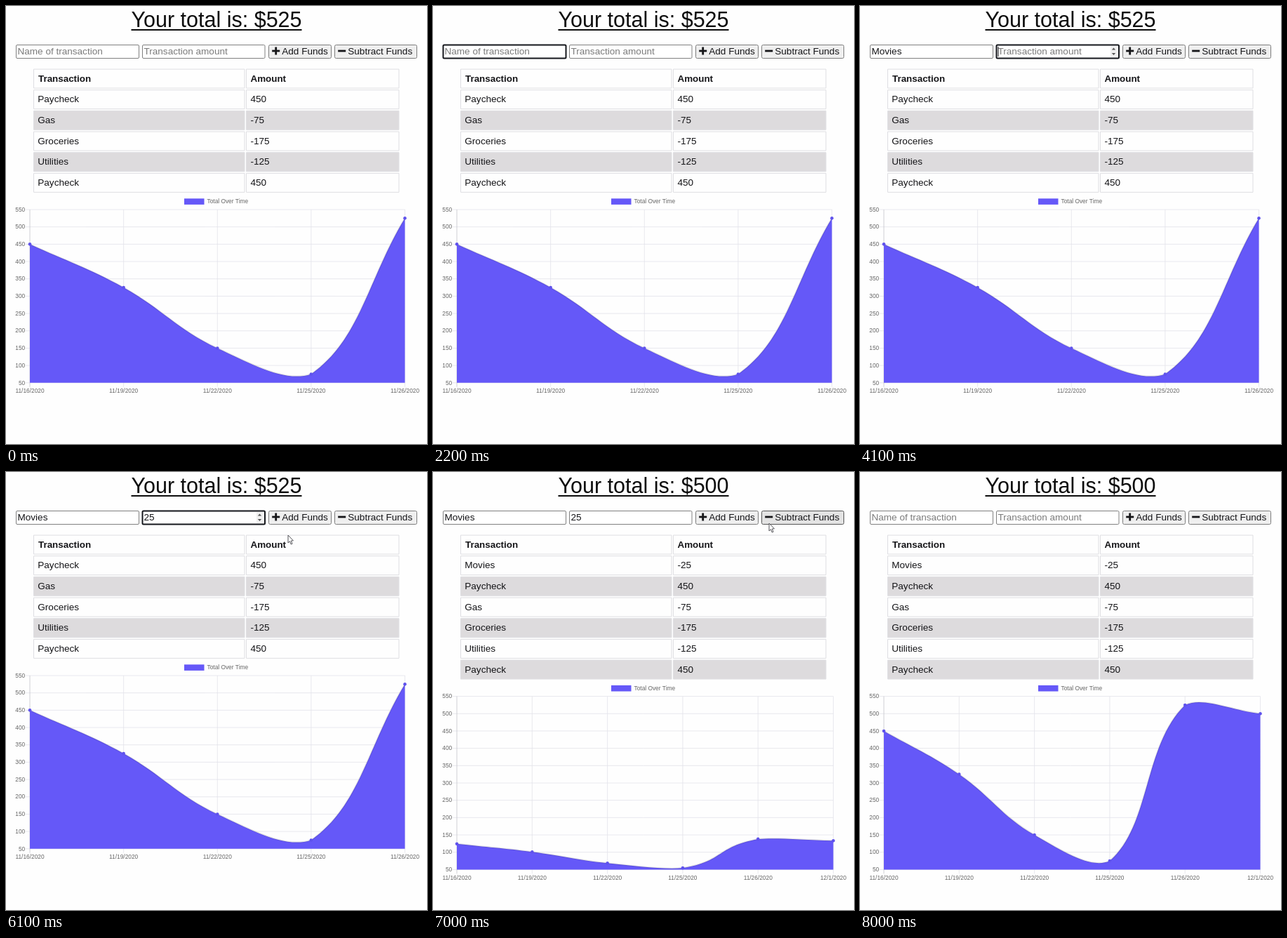
These frames come from a looping animation (600x624 px, 9 s). An HTML page with a canvas:

```html
<!DOCTYPE html>
<html lang="en">
<head>
<meta charset="utf-8">
<title>Budget tracker</title>
<style>
html, body { margin: 0; width: 600px; height: 624px; overflow: hidden; background: #fefefe; }
canvas { position: absolute; left: 0; top: 0; }
h1 {
  position: absolute; z-index: 1; left: 0; top: 1px; width: 600px; margin: 0;
  font: 30.5px/36px "Liberation Sans", Arial, sans-serif; text-align: center; color: #0c0c0c;
  text-decoration: underline; text-decoration-thickness: 2px; text-underline-offset: 3px;
}
</style>
</head>
<body>
<h1 id="total"></h1>
<canvas id="stage" width="600" height="624"></canvas>
<script>
const ctx = document.getElementById('stage').getContext('2d');
const title = document.getElementById('total');
const LOOP = 9000, STEP = 100, BLINK = 530;
const FAMILY = '"Liberation Sans", Arial, sans-serif';
const BODY = `13.55px ${FAMILY}`, SMALL = `8.35px ${FAMILY}`;
const PURPLE = '#6558f8', INK = '#151518';

const PRESS = 6900, SUBMIT = 6950, ADDED = 7000, CLEARED = 7100, HOVER = 6500, LEAVE = 7900;
const ROWS = [['Paycheck', 450], ['Gas', -75], ['Groceries', -175], ['Utilities', -125], ['Paycheck', 450]];
const NEW_ROW = ['Movies', -25];
const HISTORY = [['11/16/2020', 450], ['11/19/2020', 325], ['11/22/2020', 150], ['11/25/2020', 75], ['11/26/2020', 525]];
const NEW_POINT = ['12/1/2020', 500];

const NAME = { x: 14, w: 176, hint: 'Name of transaction', text: 'Movies',
  focus: 1670, blur: 4070, keys: [2700, 2800, 2900, 3100, 3200, 3370] };
const AMOUNT = { x: 194, w: 175.5, hint: 'Transaction amount', text: '25',
  focus: 4070, blur: PRESS, keys: [4870, 5200], spinner: true };

// Pointer trips as [time, x, y]
const TRIPS = [
  [[400, 590, 505], [500, 550, 394], [600, 550, 394], [700, 470, 300], [900, 270, 150], [1000, 170, 90]],
  [[5900, 190, 84], [6000, 300, 93], [6100, 402, 90], [6200, 446, 88], [6300, 466, 82],
   [6400, 476, 77], [6500, 479, 73], [LEAVE - STEP, 479, 73]]
];

function text(str, x, y, color = INK, font = BODY, align = 'left') {
  ctx.font = font;
  ctx.textAlign = align;
  ctx.fillStyle = color;
  ctx.fillText(str, x, y);
}

function rect(x, y, w, h, fill, stroke, line = 1, radius = 0) {
  ctx.beginPath();
  ctx.roundRect(x + .5, y + .5, w - 1, h - 1, radius);
  ctx.fillStyle = fill;
  ctx.fill();
  ctx.strokeStyle = stroke;
  ctx.lineWidth = line;
  ctx.stroke();
}

function polygon(points, fill, stroke) {
  ctx.beginPath();
  points.forEach(([x, y]) => ctx.lineTo(x, y));
  ctx.closePath();
  ctx.fillStyle = fill;
  ctx.fill();
  if (stroke) {
    ctx.strokeStyle = stroke;
    ctx.lineWidth = 1;
    ctx.stroke();
  }
}

function drawField(field, t) {
  const { x, w } = field;
  const focused = t >= field.focus && t < field.blur;
  const pressed = field.keys.filter(k => t >= k);
  const value = t < CLEARED ? field.text.slice(0, pressed.length) : '';
  rect(x, 55, w, 20, '#fff', focused ? '#15171c' : '#808080', focused ? 2 : 1, 1.5);
  text(value || field.hint, x + 2.5, 69.3, value ? INK : '#7b7b7b');
  if (!focused) return;
  if (field.spinner) {
    ctx.fillStyle = '#f0f0f0';
    ctx.fillRect(x + 163, 57, 9, 16);
    const c = x + 167.5;
    polygon([[c - 2.7, 62.5], [c, 59.5], [c + 2.7, 62.5]], '#555');
    polygon([[c - 2.7, 67], [c, 70], [c + 2.7, 67]], '#555');
  }
  const since = t - (pressed.length ? pressed[pressed.length - 1] : field.focus);
  if (since % (2 * BLINK) < BLINK) {
    const caret = x + 2.5 + (value ? ctx.measureText(value).width : 0);
    ctx.fillStyle = INK;
    ctx.fillRect(caret, 58, 1, 14);
  }
}

function drawButton(x, w, label, plus, hover, active) {
  rect(x, 55, w, 20, active ? '#f5f5f5' : hover ? '#e3e3e3' : '#efefef', hover ? '#555' : '#7c7c7c', 1, 2);
  ctx.fillStyle = INK;
  ctx.fillRect(x + 5.2, 62.6, 11, 2.8);
  if (plus) ctx.fillRect(x + 9.3, 58.5, 2.8, 11);
  text(label, x + 19.3, 69.3);
}

function drawTable(rows) {
  [['Transaction', 'Amount'], ...rows].forEach((row, i) => {
    const y = 89.5 + 29.67 * i;
    const shade = i > 0 && i % 2 === 0 ? '#dddbdd' : '#fefefe';
    const font = i ? BODY : `bold 13.4px ${FAMILY}`;
    rect(39, y, 301.5, 28, shade, '#dedee2');
    rect(342, y, 218.5, 28, shade, '#dedee2');
    text(row[0], i ? 45.3 : 46, y + 18.3, INK, font);
    text(row[1], 348.5, y + 18.3, INK, font);
  });
}

function segment(x1, y1, x2, y2, color) {
  ctx.beginPath();
  ctx.moveTo(x1, y1);
  ctx.lineTo(x2, y2);
  ctx.strokeStyle = color;
  ctx.lineWidth = .8;
  ctx.stroke();
}

// Control points either side of p, at tension 0.4
function controls(prev, p, next, top, bottom) {
  const before = Math.hypot(p.x - prev.x, p.y - prev.y);
  const after = Math.hypot(next.x - p.x, next.y - p.y);
  const at = k => ({
    x: p.x + k * (next.x - prev.x),
    y: Math.min(bottom, Math.max(top, p.y + k * (next.y - prev.y)))
  });
  return [at(-.4 * before / (before + after)), at(.4 * after / (before + after))];
}

function drawChart(data, shift, right, grow) {
  const left = 34, top = 290 + shift, bottom = 536.8 + shift;
  const yAt = value => bottom - (value - 50) / 500 * (bottom - top);
  const lift = y => bottom + (y - bottom) * grow;

  ctx.fillStyle = PURPLE;
  ctx.fillRect(254, 274.3 + shift, 28.5, 8.6);
  text('Total Over Time', 286.5, 281.2 + shift, '#666', SMALL);

  for (let v = 50; v <= 550; v += 50) {
    segment(left - 6, yAt(v), right, yAt(v), '#e3e3ea');
    text(v, 27.2, yAt(v) + 2.7, '#666', SMALL, 'right');
  }
  const points = data.map(([label, value], i) => {
    const x = left + (right - left) * i / (data.length - 1);
    segment(x, top, x, bottom + 6, i ? '#e3e3ea' : '#c4c4cc');
    text(label, x, bottom + 14.2, '#666', SMALL, 'center');
    return { x, y: yAt(value) };
  });
  const handles = points.map((p, i) =>
    controls(points[i - 1] || p, p, points[i + 1] || p, top, bottom));

  const curve = new Path2D();
  curve.moveTo(left, lift(points[0].y));
  for (let i = 1; i < points.length; i++) {
    const a = handles[i - 1][1], b = handles[i][0], p = points[i];
    curve.bezierCurveTo(a.x, lift(a.y), b.x, lift(b.y), p.x, lift(p.y));
  }
  const area = new Path2D(curve);
  area.lineTo(right, bottom);
  area.lineTo(left, bottom);
  ctx.fillStyle = PURPLE;
  ctx.fill(area);
  ctx.strokeStyle = 'rgba(0,0,0,.1)';
  ctx.lineWidth = 2;
  ctx.stroke(curve);
  ctx.fillStyle = '#5f52ec';
  for (const p of points) {
    ctx.beginPath();
    ctx.arc(p.x, lift(p.y), 2.3, 0, 2 * Math.PI);
    ctx.fill();
  }
}

function drawPointer(t) {
  const trip = TRIPS.find(s => t >= s[0][0] && t <= s[s.length - 1][0]);
  if (!trip) return;
  const i = Math.max(1, trip.findIndex(k => k[0] >= t));
  const [t0, x0, y0] = trip[i - 1], [t1, x1, y1] = trip[i];
  const k = (t - t0) / (t1 - t0);
  ctx.save();
  ctx.translate(x0 + (x1 - x0) * k, y0 + (y1 - y0) * k);
  polygon([[0, 0], [0, 11], [2.5, 8.7], [4.2, 13], [6, 12.2], [4.3, 8], [7.4, 7.8]], '#fff', '#55555a');
  ctx.restore();
}

function draw(t) {
  const added = t >= ADDED;
  const hover = t >= HOVER && t < LEAVE;
  const heading = `Your total is: $${added ? 500 : 525}`;
  if (title.textContent !== heading) title.textContent = heading;

  ctx.fillStyle = '#fefefe';
  ctx.fillRect(0, 0, 600, 624);
  drawField(NAME, t);
  drawField(AMOUNT, t);
  drawButton(374, 90, 'Add Funds', true);
  drawButton(468, 118, 'Subtract Funds', false, hover, t >= PRESS && t < ADDED);
  drawTable(added ? [NEW_ROW, ...ROWS] : ROWS);

  const progress = Math.min(1, (t - SUBMIT) / 1000);
  if (added) drawChart([...HISTORY, NEW_POINT], 29.6, 570.5, 1 - (1 - progress) ** 4);
  else drawChart(HISTORY, 0, 568.5, 1);
  drawPointer(t);
}

const start = performance.now();
function frame() {
  const elapsed = (performance.now() - start) % LOOP;
  draw(Math.floor(elapsed / STEP) * STEP);
  requestAnimationFrame(frame);
}
frame();
</script>
</body>
</html>
```
